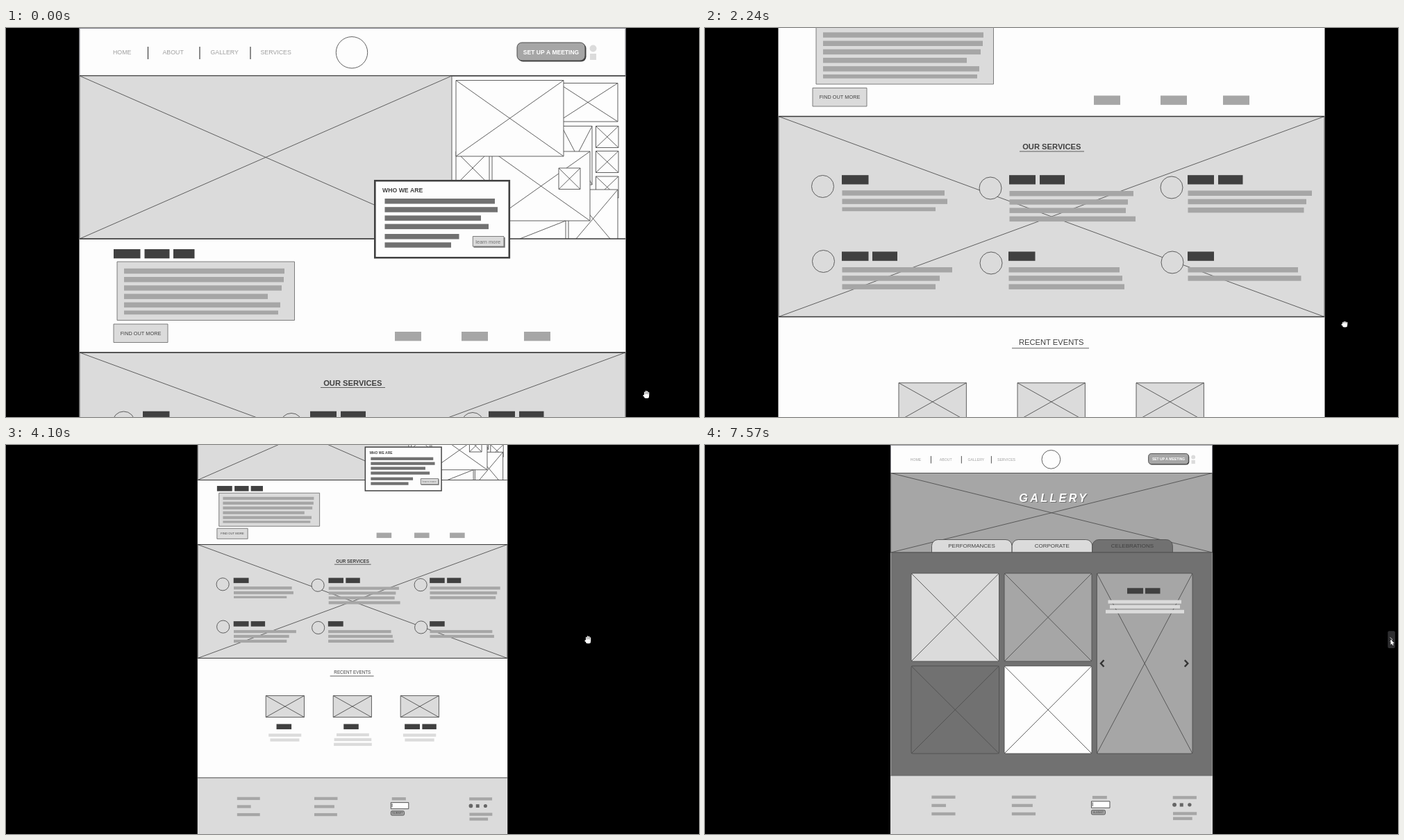
An HTML page with a canvas for the animation above (8 s loop, 998x561 px).

```html
<!DOCTYPE html>
<html lang="en">
<head>
<meta charset="utf-8">
<title>Wireframe preview</title>
<style>
  html, body { margin: 0; width: 100%; height: 100%; overflow: hidden; background: #000; }
  canvas { display: block; }
</style>
</head>
<body>
<canvas id="stage" width="998" height="561"></canvas>
<script>
const ctx = document.getElementById('stage').getContext('2d');
const LOOP = 8000, LEFT = 106, RIGHT = 892, CENTER = 499;
const WHITE = '#fdfdfd', LIGHT = '#dbdbdb', GREY = '#a6a6a6', MID = '#717171', DARK = '#404040', LINE = '#505050';
const HOME_HEIGHT = 1204, INNER_HEIGHT = 1143, GALLERY_HEIGHT = 952;
const FIT = 561 / HOME_HEIGHT;
let hair = 1; // one stage pixel in page units

// Linear interpolation through [time, value] keys.
function track(t, keys) {
  let i = 1;
  while (i < keys.length - 1 && t > keys[i][0]) i++;
  const [t0, a] = keys[i - 1], [t1, b] = keys[i];
  const k = Math.min(1, Math.max(0, (t - t0) / (t1 - t0)));
  return a + (b - a) * k;
}

// Shapes take edges: left, top, right, bottom.
function fill(color, l, t, r, b) {
  ctx.fillStyle = color;
  ctx.fillRect(l, t, r - l, b - t);
}
function line(l, t, r, b, color = LINE, width = hair) {
  ctx.strokeStyle = color;
  ctx.lineWidth = width;
  ctx.beginPath();
  ctx.moveTo(l, t);
  ctx.lineTo(r, b);
  ctx.stroke();
}
function box(color, l, t, r, b, { radius = 0, stroke = LINE, width = hair } = {}) {
  ctx.beginPath();
  ctx.roundRect(l, t, r - l, b - t, radius);
  ctx.fillStyle = color;
  ctx.fill();
  if (!stroke) return;
  ctx.strokeStyle = stroke;
  ctx.lineWidth = width;
  ctx.stroke();
}
function crossed(color, l, t, r, b, style) {
  box(color, l, t, r, b, style);
  line(l, t, r, b);
  line(r, t, l, b);
}
function circle(x, y, r, color, stroke = LINE) {
  box(color, x - r, y - r, x + r, y + r, { radius: r, stroke });
}
function text(str, x, y, size, color, { weight = '', align = 'left' } = {}) {
  ctx.font = `${weight} ${size}px "Liberation Sans", Arial, sans-serif`;
  ctx.textAlign = align;
  ctx.fillStyle = color;
  ctx.fillText(str, x, y);
}
// Left-aligned placeholder lines, one for each right edge.
function lines(color, x, y, ...ends) {
  ends.forEach((end, i) => fill(color, x, y + i * 12.2, end, y + i * 12.2 + 7.5));
}
// Dark placeholder words, given as pairs of edges.
function words(color, y, ...edges) {
  for (let i = 0; i < edges.length; i += 2) fill(color, edges[i], y, edges[i + 1], y + 13.3);
}
function rule(y) {
  line(LEFT, y, RIGHT, y, '#383838', Math.max(1.3, hair));
}

function header() {
  box(WHITE, LEFT, 0.5, RIGHT, 69, { stroke: '#77777f' });
  [['HOME', 154], ['ABOUT', 225.5], ['GALLERY', 294.5], ['SERVICES', 366.5]]
    .forEach(([label, x]) => text(label, x, 38.3, 8.8, '#a0a0a0'));
  [204.5, 279, 352].forEach(x => line(x, 27, x, 45, DARK, Math.max(1.2, hair)));
  circle(498, 35.3, 22.7, WHITE);
  box(DARK, 737.5, 22.5, 835.5, 48.5, { radius: 7, stroke: null });
  box(GREY, 736, 21, 834, 47, { radius: 7, stroke: DARK });
  text('SET UP A MEETING', 785, 37.6, 8.5, '#fff', { weight: 'bold', align: 'center' });
  circle(845.5, 29.5, 5, LIGHT, null);
  fill(LIGHT, 841, 37, 850, 46);
  rule(69);
}

function collage() {
  ctx.save();
  ctx.beginPath();
  ctx.rect(LEFT, 69, RIGHT - LEFT, 235);
  ctx.clip();
  crossed(WHITE, 795, 79.5, 881, 135);
  crossed(WHITE, 800, 141.5, 844, 226);
  [141.5, 177.5, 214].forEach(y => crossed(WHITE, 849.5, y, 882, y + 31));
  crossed(WHITE, 810, 233, 881, 317);
  crossed(WHITE, 648, 178, 696, 226);
  line(740, 304, 806, 278);
  line(806, 278, 806, 304);
  crossed(WHITE, 700, 178, 841, 278);
  crossed(WHITE, 648, 75.5, 803, 185);
  crossed(WHITE, 796, 202, 827, 232.5);
  ctx.restore();
}

function whoWeAre() {
  box(WHITE, 531.3, 220.3, 724.8, 331.3, { stroke: DARK, width: 2.6 });
  text('WHO WE ARE', 542, 237.2, 8.7, DARK, { weight: 'bold' });
  lines(MID, 545.5, 246, 704, 708, 684, 695);
  lines(MID, 545.5, 297, 652.5, 641);
  fill(MID, 673.5, 302, 718.7, 316.7);
  box(LIGHT, 672.3, 300.5, 717, 315, { stroke: MID });
  text('learn more', 676.3, 310.8, 7.5, MID);
}

function intro() {
  words(DARK, 319, 155, 193.5, 199.5, 235.5, 241, 271.5);
  box(LIGHT, 160, 337, 415.5, 421.5, { stroke: MID });
  lines(GREY, 170, 346.8, 401, 400, 397, 377, 395);
  fill(GREY, 170, 407.5, 392, 413.2);
  box(LIGHT, 155, 427, 233, 453.5, { stroke: MID });
  text('FIND OUT MORE', 194, 443, 7.35, DARK, { align: 'center' });
  words(GREY, 438, 560, 598, 656, 694, 746, 784);
}

function services() {
  crossed(LIGHT, LEFT, 468, RIGHT, 757);
  rule(468);
  rule(757);
  text('OUR SERVICES', 499.3, 515.5, 11.2, DARK, { weight: 'bold', align: 'center' });
  line(453, 518.5, 546, 518.5);
  [[169.5, 569], [411, 571.5], [672, 570.5], [170.5, 677], [412, 679.5], [673, 678.5]]
    .forEach(([x, y]) => circle(x, y, 16, LIGHT));
  words(DARK, 552.7, 197, 235.5, 438, 476, 482, 518, 695, 733, 739, 774.5);
  lines(GREY, 197.5, 574.7, 345, 349);
  fill(GREY, 197.5, 599, 332, 604.7);
  lines(GREY, 438.5, 575.5, 617, 609, 606, 620);
  lines(GREY, 695.5, 575, 874, 866, 862.5);
  words(DARK, 663, 197, 235.5, 241, 277, 437, 475.5, 695, 733);
  lines(GREY, 197.5, 685.5, 356, 338, 332);
  lines(GREY, 437.5, 685.5, 597, 601, 604);
  lines(GREY, 695.5, 685.5, 854, 858.5);
}

function events() {
  text('RECENT EVENTS', 498.7, 797.5, 11.15, DARK, { align: 'center' });
  line(442, 802.3, 553, 802.3);
  [279, 450, 621].forEach(x => crossed(LIGHT, x, 852.3, x + 97.4, 907));
  words(DARK, 924.4, 306, 344, 476.5, 514.5, 631.5, 670, 676, 712);
  lines(LIGHT, 286, 949, 369);
  lines(LIGHT, 290, 961.2, 364);
  lines(LIGHT, 458.5, 948, 541);
  lines(LIGHT, 452.5, 960.2, 547);
  lines(LIGHT, 451.5, 972.4, 548);
  lines(LIGHT, 627.5, 949, 711);
  lines(LIGHT, 632, 961.2, 706.5);
}

function footer(pageHeight) {
  ctx.save();
  ctx.translate(0, pageHeight - HOME_HEIGHT);
  fill(LIGHT, LEFT, 1061, RIGHT, HOME_HEIGHT);
  rule(1061);
  [[206, 264, 241, 264], [402, 461, 453, 460]].forEach(([x, ...ends]) =>
    ends.forEach((end, i) => lines(GREY, x, 1110 + i * 20.5, end)));
  lines(GREY, 599, 1110.7, 634.5);
  box(WHITE, 596.5, 1124, 641.5, 1140, { stroke: DARK });
  line(599.5, 1126.5, 599.5, 1136, DARK);
  box(GREY, 596.5, 1145.5, 630.5, 1156.5, { radius: 3 });
  text('SUBMIT', 613.3, 1153.7, 7.3, DARK, { align: 'center' });
  lines(GREY, 795.5, 1111, 853.5);
  lines(GREY, 796, 1150.2, 854, 843);
  circle(799.5, 1132.5, 5, '#666', null);
  fill('#666', 812.5, 1128.5, 821, 1137);
  circle(836.5, 1132.5, 4.5, '#666', null);
  ctx.restore();
}

function placePage(scale, height, scroll = height - 561) {
  const top = height * (1 - scale) - scroll;
  ctx.setTransform(scale, 0, 0, scale, CENTER * (1 - scale), top);
  hair = 0.9 / scale;
  fill(WHITE, LEFT - 0.5, 0, RIGHT + 0.5, height);
}
function resetView() {
  ctx.setTransform(1, 0, 0, 1, 0, 0);
  hair = 0.9;
}

function homePage(t) {
  const scroll = track(t, [[720, 0], [1140, 172], [1420, 250], [2020, 250], [2240, 340], [2800, 622], [2860, 643]]);
  const scale = track(t, [[3450, 1], [4070, 0.5893], [4100, 0.5677], [4250, 0.49], [4450, FIT]]);
  placePage(scale, HOME_HEIGHT, scroll);
  header();
  crossed(LIGHT, LEFT, 69, 642, 304);
  collage();
  rule(304);
  intro();
  whoWeAre();
  services();
  events();
  footer(HOME_HEIGHT);
}

function innerPage() {
  placePage(561 / INNER_HEIGHT, INNER_HEIGHT);
  header();
  crossed(LIGHT, LEFT, 69, RIGHT, 304);
  rule(304);
  intro();
  services();
  events();
  footer(INNER_HEIGHT);
}

function chevron(x, y, dir) {
  ctx.strokeStyle = '#333';
  ctx.lineWidth = 2.4;
  ctx.beginPath();
  ctx.moveTo(x - 2.5 * dir, y - 4.8);
  ctx.lineTo(x + 2 * dir, y);
  ctx.lineTo(x - 2.5 * dir, y + 4.8);
  ctx.stroke();
}

function galleryPage(selected) {
  placePage(561 / GALLERY_HEIGHT, GALLERY_HEIGHT);
  header();
  footer(GALLERY_HEIGHT);
  resetView();
  crossed(GREY, 267.7, 40.5, 730.5, 155);
  ctx.letterSpacing = '3.3px';
  const title = { weight: 'italic bold' };
  text('GALLERY', 453.5, 83, 16.2, MID, title);
  text('GALLERY', 452.3, 81.8, 16.2, '#fff', title);
  ctx.letterSpacing = '0px';
  ['PERFORMANCES', 'CORPORATE', 'CELEBRATIONS'].forEach((label, i) => {
    const x = 326.5 + i * 115.7;
    box(i === selected ? MID : LIGHT, x, 136.5, x + 115.5, 155, { radius: [9, 9, 0, 0] });
    text(label, x + 57.5, 148.4, 8, DARK, { align: 'center' });
  });
  fill(MID, 267.5, 155, 730.7, 476.4);
  line(267.5, 155, 730.7, 155);
  const rounded = { radius: 2 };
  crossed(LIGHT, 297, 185, 423.5, 312, rounded);
  crossed(GREY, 431, 185, 557, 312, rounded);
  crossed(MID, 297, 318.7, 423.5, 445, rounded);
  crossed(WHITE, 431, 318.7, 557, 445, rounded);
  crossed(GREY, 564.3, 185, 702, 445, rounded);
  fill(DARK, 608, 206.3, 631, 214.5);
  fill(DARK, 634, 206.3, 655.5, 214.5);
  fill(LIGHT, 580.5, 223.7, 686, 228.7);
  fill(LIGHT, 583, 230.8, 684, 235.8);
  fill(LIGHT, 577, 237.8, 690, 242.8);
  chevron(572, 315, -1);
  chevron(693.3, 315, 1);
}

function hand(x, y, closed) {
  const white = { radius: 1.2, stroke: null };
  box('#fff', x - 3, y - 1, x + 4, y + 5, { radius: 2.5, stroke: null });
  const heights = closed ? [2.5, 3.5, 3.3, 2.5] : [4.5, 6, 5.5, 4];
  heights.forEach((h, i) => box('#fff', x - 3 + i * 1.9, y - h, x - 1.5 + i * 1.9, y + 2, white));
  box('#fff', x - 4.5, y, x - 2, y + 2.5, white);
}
function arrow(x, y) {
  ctx.fillStyle = '#fff';
  ctx.beginPath();
  [[0, 0], [0, 7.6], [1.7, 6.1], [2.9, 8.6], [4.1, 8], [3, 5.6], [5.2, 5.4]]
    .forEach(([dx, dy]) => ctx.lineTo(x + dx, y + dy));
  ctx.fill();
}

function pointer(t) {
  const x = track(t, [[700, 922], [740, 921], [1140, 913], [1420, 911], [1560, 911], [1960, 922],
    [2240, 921], [2800, 931], [2860, 932], [3200, 943], [3500, 943], [4070, 838], [4940, 838], [5140, 896], [5620, 987.5]]);
  const y = track(t, [[700, 529], [740, 519], [1140, 347], [1420, 269], [1560, 269], [1960, 517],
    [2020, 517], [2240, 427], [2800, 149], [2860, 128], [3500, 200], [4070, 281], [4940, 290], [5140, 296], [5620, 280.5]]);
  if (t >= 5560) {
    box('#2f2f31', 983.3, 268.3, 993.8, 293, { radius: 2, stroke: null });
    line(986.5, 277.5, 990, 280.5, '#ddd');
    line(990, 280.5, 986.5, 283.5, '#ddd');
  }
  if (t >= 4400) return arrow(x, y);
  const dragging = (t >= 520 && t < 1440) || (t >= 1990 && t < 2900);
  hand(x, y, dragging);
}

function draw(now) {
  const t = now % LOOP;
  resetView();
  fill('#000', 0, 0, 998, 561);
  if (t < 6070) homePage(t);
  else if (t < 7140) innerPage();
  else galleryPage(t < 7470 ? 1 : 2);
  resetView();
  pointer(t);
}

const start = performance.now();
function frame() {
  draw(performance.now() - start);
  requestAnimationFrame(frame);
}
frame();
</script>
</body>
</html>
```
